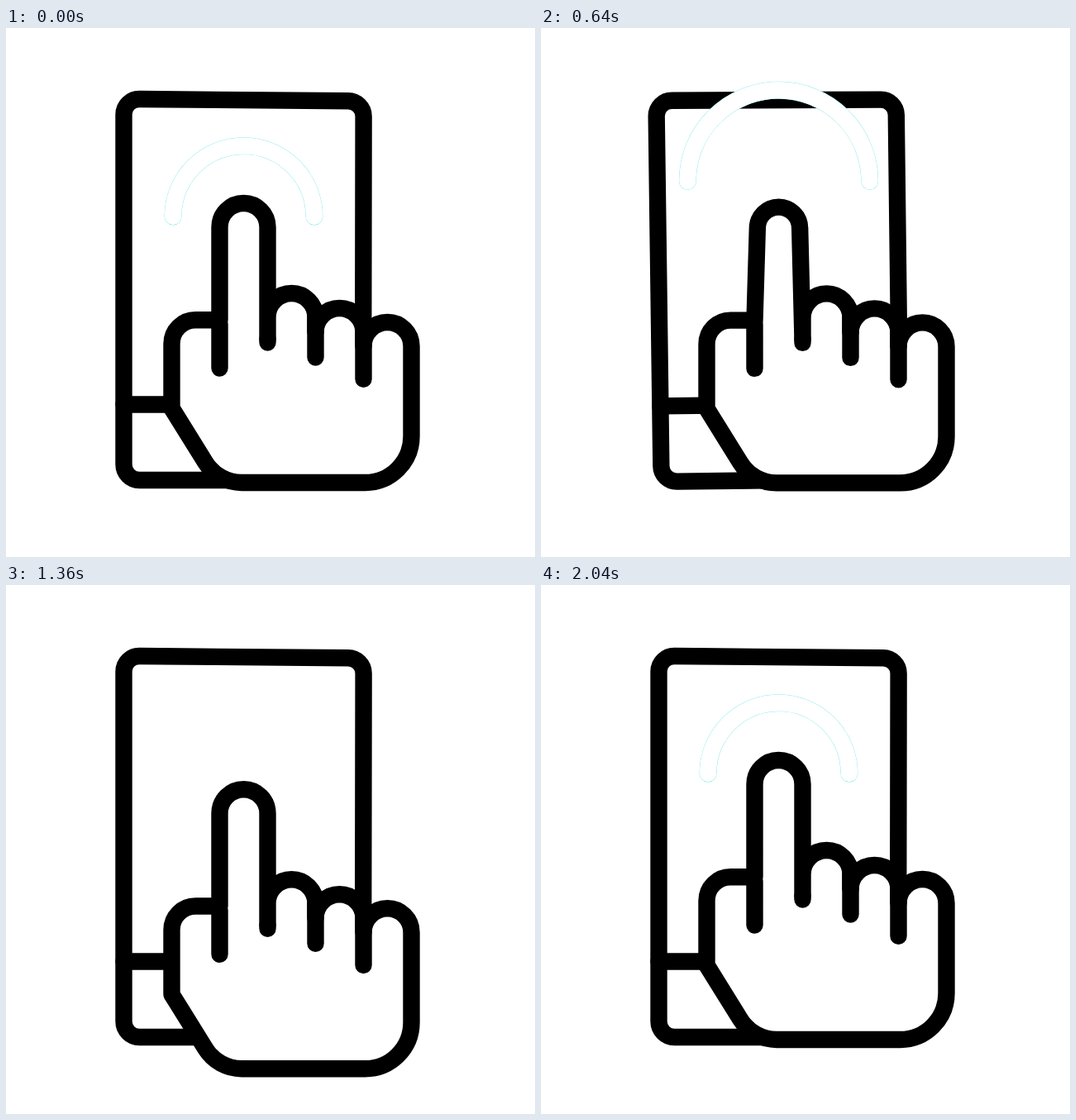
Animation of 640 by 640 pixels, one loop 2.12 s. Source, as an HTML page:

```html
<!DOCTYPE html>
<html lang="en">
<head>
<meta charset="utf-8">
<title>Swipe gesture</title>
<style>
  html, body { margin: 0; width: 100%; height: 100%; overflow: hidden; background: #fff; }
  svg { display: block; width: 100%; height: 100%; }
  path { stroke-width: 20.4; stroke-linecap: round; stroke-linejoin: round; }
  .ink { stroke: #000; fill: none; }
  .solid { fill: #fff; }
  #edge { stroke: #5edede; stroke-width: 20.9; }
  #band { stroke: #fff; }
</style>
</head>
<body>
<svg viewBox="0 0 640 640">
  <g id="phone">
    <path class="ink solid" d="M142.5 104.5A18.7 18.7 0 0 1 161.5 86L414 88.3A18.7 18.7 0 0 1 432.6 107L432 528A19 19 0 0 1 413 547H161.5A19 19 0 0 1 142.5 528Z"/>
    <path class="ink" d="M142.5 455.5H232"/>
  </g>
  <g id="arc" fill="none">
    <path id="edge"/>
    <path id="band"/>
  </g>
  <g id="hand">
    <path id="outline" class="ink solid"/>
    <path class="ink" d="M258.5 358V411.5M316.5 376V380.5M374.5 350V398.5M432.5 368V424.8"/>
  </g>
</svg>
<script>
const LOOP = 2120, STEP = 40;
const $ = id => document.getElementById(id);

// Eased interpolation through [time, value] keys.
function track(t, ...keys) {
  if (t <= keys[0][0]) return keys[0][1];
  for (let i = 1; i < keys.length; i++) {
    const [t0, a] = keys[i - 1], [t1, b] = keys[i];
    if (t < t1) return a + (b - a) * (1 - Math.cos(Math.PI * (t - t0) / (t1 - t0))) / 2;
  }
  return keys[keys.length - 1][1];
}

function handPath(squeeze) {
  const r = 29 - 4 * squeeze, y = 241 + squeeze;
  return `M200.5 460V382A28.8 28.8 0 0 1 229.3 353.2H258.5L${287.5 - r} ${y}` +
    `A${r} ${r} 0 0 1 ${287.5 + r} ${y}L316.5 376V350` +
    'A29 29 0 0 1 374.5 350V368A29 29 0 0 1 432.5 368V385A29 29 0 0 1 490.5 385' +
    'V494A56 56 0 0 1 434.5 550H285A51.6 51.6 0 0 1 241.2 525.5Z';
}

function arcPath(scale, rise) {
  const r = 85.4 * scale, mid = 187.2 + rise, half = 40.8 * scale;
  return `M${287.5 - r} ${mid + half}A${r} ${r} 0 0 1 ${287.5 + r} ${mid + half}`;
}

function draw(t) {
  const tilt = track(t, [100, 0], [400, -8], [700, 0]);
  $('phone').setAttribute('transform', `rotate(${tilt} 287.5 316.5)`);

  const squeeze = track(t, [100, 0], [400, 1], [560, 1], [860, 0]);
  const drop = track(t, [600, 0], [1200, 38.4], [1240, 38.4], [1890, 0]);
  $('outline').setAttribute('d', handPath(squeeze));
  $('hand').setAttribute('transform', `translate(0 ${drop})`);

  const rewound = t >= 2040;
  const at = rewound ? 0 : t;
  const scale = track(at, [160, 1], [400, 0.843], [640, 1.29], [800, 1]);
  const d = arcPath(scale, track(at, [160, 0], [862, -70.5]));
  $('band').setAttribute('d', d);
  $('edge').setAttribute('d', d);
  $('edge').style.display = at < 860 ? '' : 'none';
  $('arc').style.display = at < 1240 ? '' : 'none';
}

const start = performance.now();
function tick() {
  const t = (performance.now() - start) % LOOP;
  draw(Math.floor(t / STEP) * STEP);
  requestAnimationFrame(tick);
}
tick();
</script>
</body>
</html>
```
